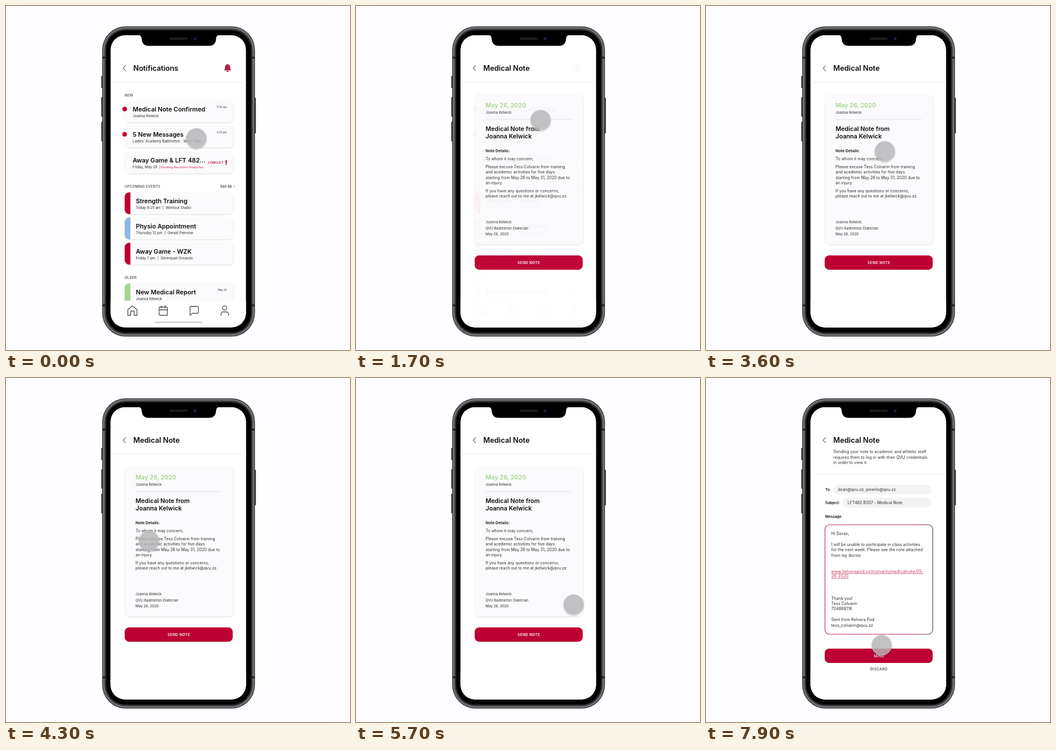
These frames come from a looping animation (600x600 px, 8000 ms). An HTML page:

```html
<!DOCTYPE html>
<html lang="en">
<head>
<meta charset="utf-8">
<title>Medical note</title>
<style>
  html, body { margin: 0; width: 100%; height: 100%; overflow: hidden; background: #fefdff; }
  svg { display: block; width: 600px; height: 600px; }
  text { font-family: Inter, "Open Sans", sans-serif; white-space: pre; }
  .card { fill: #fbfafc; filter: url(#soft); }
  .icon { fill: none; stroke: #505055; stroke-width: 1.3; stroke-linecap: round; stroke-linejoin: round; }
</style>
</head>
<body>
<svg viewBox="0 0 600 600">
  <defs>
    <filter id="soft" x="-10%" y="-20%" width="120%" height="150%">
      <feDropShadow dx="0.3" dy=".8" stdDeviation=".8" flood-color="#000" flood-opacity=".15"/>
    </filter>
    <filter id="drop" x="-30%" y="-30%" width="160%" height="170%">
      <feDropShadow dx="0" dy="1.5" stdDeviation="1.2" flood-color="#000" flood-opacity=".25"/>
    </filter>
    <linearGradient id="edge">
      <stop offset="0" stop-color="#c52a55"/><stop offset=".85" stop-color="#b5264d"/>
      <stop offset="1" stop-color="#4d4348"/>
    </linearGradient>
    <clipPath id="display"><rect x="182.500" y="51" width="236" height="509.500" rx="25"/></clipPath>
  </defs>

  <g fill="#4a4a4d">
    <rect x="166" y="122" width="4" height="21" rx="1"/>
    <rect x="166" y="159" width="4" height="34" rx="1"/>
    <rect x="166" y="202" width="4" height="34" rx="1"/>
    <rect x="432" y="160" width="4" height="62" rx="1"/>
  </g>
  <g id="frame"></g>
  <path d="M168 90h6M428 90h6M168 522h6M428 522h6" stroke="#1c1c1e" stroke-width="3"/>

  <g clip-path="url(#display)">
    <g id="list"></g>
    <g id="note"></g>
    <g id="mail"></g>
  </g>

  <path d="M230 50H373Q367 51 366.500 56Q366 69.500 354 69.500H249Q237 69.500 236.500 56Q236 51 230 50Z"/>
  <rect x="285" y="55" width="32" height="4" rx="2" fill="#1c1c1f"/>
  <circle cx="330" cy="57" r="3" fill="#10152b"/>
  <circle cx="330" cy="57" r="1.200" fill="#26336a"/>

  <g id="cursor" opacity=".83">
    <circle r="17.500" fill="#b7b5b7" stroke="#c6c4c6" filter="url(#drop)"/>
  </g>
</svg>

<script>
const RED = '#bd0033', BLUE = '#8fb8e2', GREEN = '#a5d48c', INK = '#2c2c2f';
const $ = id => document.getElementById(id);

const text = (x, y, size, str, { fill = INK, weight = 400, anchor = 'start', gap = 0, more = '' } = {}) =>
  `<text x="${x}" y="${y}" font-size="${size}" fill="${fill}" font-weight="${weight}"
    text-anchor="${anchor}" letter-spacing="${gap}" ${more}>${str}</text>`;
const rect = (x, y, w, h, r, attrs) => `<rect x="${x}" y="${y}" width="${w}" height="${h}" rx="${r}" ${attrs}/>`;
const path = (d, attrs) => `<path d="${d}" ${attrs}/>`;

const bold = (x, y, size, str, fill = '#0c0c0e') => text(x, y, size, str, { fill, weight: 600 });
const label = (y, str) => text(207, y, 6, str, { fill: '#444448', weight: 500, gap: .22 });
const lines = (x, size, rows) => rows.map(([y, str]) => text(x, y, size, str)).join('');

// Metal rim, from the outside in
const ring = (inset, fill) =>
  rect(167.8 + inset, 35.5 + inset, 266.4 - 2 * inset, 541 - 2 * inset, 41 - inset, `fill="${fill}"`);
$('frame').innerHTML = ring(0, '#303033') + ring(1.3, '#77777b') + ring(3.6, '#4a4a4d') +
  ring(5.4, '#232325') + ring(7.2, '#000');

const page = (title, ruleY) =>
  rect(182, 50, 237, 511, 0, 'fill="#fff"') +
  path(`M182 ${ruleY}H419`, 'stroke="#f5f4f6" stroke-width="1.500"') +
  path('M208.500 104L204.200 108.500L208.500 113', 'class="icon" style="stroke:#828286"') +
  bold(222, 113, 12.7, title);

const card = (y, title, sub, { strip, dot, time } = {}) => {
  const x = strip ? 226.5 : 221;
  return rect(207, y, 189, 38, 8, 'class="card"') +
    (strip ? path(`M217 ${y}v38h-2a8 8 0 0 1 -8 -8v-22a8 8 0 0 1 8 -8z`, `fill="${strip}"`) : '') +
    (dot ? `<circle cx="207" cy="${y + 14.7}" r="4" fill="${RED}"/>` : '') +
    bold(x, y + 18.6, 10.75, title) +
    text(x, y + 29.2, 6.15, sub) +
    (time ? text(385, y + 12.7, 4.4, time, { anchor: 'end' }) : '');
};

const button = (y, str) =>
  rect(207, y, 188.5, 25, 8, `fill="${RED}"`) +
  text(301.5, y + 15.4, 6.3, str, { fill: '#fff', weight: 600, anchor: 'middle', gap: .35 });

$('list').innerHTML = page('Notifications', 133) +
  path('M380.500 112.300V111.500Q382 110.500 382 106.500A4.500 4.500 0 0 1 391 106.500Q391 110.500 392.500 111.500V112.300ZM384.500 113h4a2 2 0 0 1 -4 0zM385.500 101h2v2h-2z', 'fill="#b81e42"') +
  label(157.5, 'NEW') +
  card(165, 'Medical Note Confirmed', 'Joanna Kelwick', { dot: 1, time: '11:43 am' }) +
  card(209, '5 New Messages', 'Ladies’ Academy Badminton - Main Team', { dot: 1, time: '6:25 pm' }) +
  card(254, 'Away Game &amp; LFT 482...', 'Friday, May 29') +
  text(267.3, 283, 6, '|') +
  text(270.5, 283, 5.3, 'Pending Resolution Response', { fill: '#cc2552' }) +
  text(352, 275, 5.2, 'CONFLICT', { fill: RED, weight: 600, gap: .1 }) +
  text(382, 277, 11, '!', { fill: RED, weight: 900 }) +
  label(317, 'UPCOMING EVENTS') +
  text(373.5, 317, 6.2, 'See All', { weight: 500 }) +
  path('M397.500 313l1.500 1.800l-1.500 1.800', 'class="icon" style="stroke-width:.6"') +
  card(325, 'Strength Training', 'Today 8:25 am  |  Workout Studio', { strip: RED }) +
  card(369, 'Physio Appointment', 'Thursday 12 pm  |  Gerald Pemrow', { strip: BLUE }) +
  card(413, 'Away Game - WZK', 'Friday 7 pm  |  Silverquail Grounds', { strip: RED }) +
  label(476, 'OLDER') +
  card(484, 'New Medical Report', 'Joanna Kelwick', { strip: GREEN, time: 'May 25' }) +
  rect(182, 514, 237, 50, 0, 'fill="#fff" filter="url(#drop)"') +
  path(`M212.500 529.500L220.500 523L228.500 529.500V539.500H223.500V533a1 1 0 0 0 -1 -1h-4a1 1 0 0 0 -1 1V539.500H212.500Z
    M269 525h10.500a2 2 0 0 1 2 2v10.500a2 2 0 0 1 -2 2h-10.500a2 2 0 0 1 -2 -2v-10.500a2 2 0 0 1 2 -2zM267 530h14.500M271 523v4M277.500 523v4
    M322.500 524h11.500a1.500 1.500 0 0 1 1.500 1.500v9a1.500 1.500 0 0 1 -1.500 1.500h-9l-4 3.500v-14a1.500 1.500 0 0 1 1.500 -1.500z
    M375 539.500v-2a4 4 0 0 1 4 -4h5a4 4 0 0 1 4 4v2M385.200 526.500a3.700 3.700 0 1 1 -7.400 0a3.700 3.700 0 1 1 7.400 0`, 'class="icon"') +
  rect(259.5, 550, 83, 3.2, 1.6, 'fill="#d7d6d8"');

$('note').innerHTML = page('Medical Note', 133) +
  rect(207, 155, 189, 260.5, 8, 'class="card"') +
  bold(226, 177, 10.6, 'May 26, 2020', GREEN) +
  text(226, 187.5, 6.15, 'Joanna Kelwick') +
  path('M226 198H376', 'stroke="#d9d8da" stroke-width=".8"') +
  bold(226, 217.8, 10.6, 'Medical Note from') +
  bold(226, 231, 10.6, 'Joanna Kelwick') +
  bold(226, 255, 6.8, 'Note Details:') +
  lines(226, 7, [
    [269, 'To whom it may concern,'],
    [282.7, 'Please excuse Tess Colvarin from training'],
    [292.2, 'and acedemic activities for five days'],
    [301.6, 'starting from May 26 to May 31, 2020 due to'],
    [311, 'an injury.'],
    [324.6, 'If you have any questions or concerns,'],
    [334, 'please reach out to me at jkelwick@qvu.zz.'],
  ]) +
  lines(226, 6.15, [[379.3, 'Joanna Kelwick'], [389.8, 'QVU Badminton Diatecian'], [400.3, 'May 26, 2020']]) +
  button(435, 'SEND NOTE');

const link = { fill: '#c8325c', gap: .12, more: 'text-decoration="underline"' };
$('mail').innerHTML = page('Medical Note', 168) +
  lines(222, 7.1, [
    [131, 'Sending your note to academic and athletic staff'],
    [140.5, 'requires them to log in with their QVU credentials'],
    [150, 'in order to view it.'],
  ]) +
  bold(208, 197, 6.4, 'To:') + rect(222, 186, 172, 17, 8.5, 'fill="#f3f2f4"') +
  bold(208, 220, 6.4, 'Subject:') + rect(238, 209, 156, 17, 8.5, 'fill="#f3f2f4"') +
  bold(208, 244, 6.4, 'Message:') +
  text(230, 196.8, 7, 'dzan@qvu.zz, pmerlo@qvu.zz') +
  text(247, 219.8, 7, 'LFT482 B307 - Medical Note') +
  rect(207.5, 256, 188, 191, 8, 'fill="#fff" stroke="url(#edge)" stroke-width="1.100"') +
  lines(218.5, 7.1, [
    [274, 'Hi Doran,'],
    [293, 'I will be unable to participate in class activities'],
    [302.4, 'for the next week. Please see the note attached'],
    [311.8, 'from my doctor.'],
    [386.5, 'Thank you!'],
    [396, 'Tess Colvarin'],
    [405.4, '704888116'],
    [424.4, 'Sent from Kelvora Pod'],
    [433.8, 'tess_colvarin@qvu.zz'],
  ]) +
  text(218.5, 339.8, 7.1, 'www.kelvorapod.zz/tcolvarin/medicalnote/05-', link) +
  text(218.5, 348.3, 7.1, '26-2020', link) +
  button(472, 'SEND') +
  text(301.5, 510.4, 6.3, 'DISCARD', { fill: '#3c3c40', weight: 500, anchor: 'middle', gap: .4 });

// Cursor path: time in ms, x, y
const keys = [
  [0, 332, 231], [450, 326.5, 211], [900, 322, 199], [1700, 322, 199], [1900, 322, 203],
  [2200, 322, 228], [2650, 322, 251], [3000, 322, 251], [3100, 320, 250], [3300, 320, 250],
  [3600, 312, 253.5], [3900, 284, 268], [4250, 249, 284], [5000, 318, 285], [5100, 335, 288],
  [5600, 380, 370], [6000, 375, 463], [6600, 310, 470], [6900, 306.5, 466], [8000, 306.5, 466],
];

// Smooth interpolation that never overshoots a key
function along(t, axis) {
  const last = keys.length - 2;
  let i = 0;
  while (i < last && keys[i + 1][0] <= t) i++;
  const slope = j => (keys[j + 1][axis] - keys[j][axis]) / (keys[j + 1][0] - keys[j][0]);
  const tangent = j => {
    if (j === 0) return slope(0);
    if (j > last) return 0;
    const a = slope(j - 1), b = slope(j);
    return a * b > 0 ? 2 * a * b / (a + b) : 0;
  };
  const span = keys[i + 1][0] - keys[i][0], p = (t - keys[i][0]) / span, q = 1 - p;
  return keys[i][axis] * (1 + 2 * p) * q * q + tangent(i) * span * p * q * q +
    keys[i + 1][axis] * p * p * (3 - 2 * p) - tangent(i + 1) * span * p * p * q;
}

const fade = (t, from, to) => {
  const p = Math.min(1, Math.max(0, (t - from) / (to - from)));
  return p * p * (3 - 2 * p);
};

function draw(now) {
  const t = now % 8000;
  $('note').setAttribute('opacity', fade(t, 1300, 1750));
  $('mail').setAttribute('opacity', fade(t, 7200, 7500));
  $('cursor').setAttribute('transform', `translate(${along(t, 1)} ${along(t, 2)})`);
}

const start = performance.now();
function tick() {
  draw(performance.now() - start);
  requestAnimationFrame(tick);
}
tick();
</script>
</body>
</html>
```
